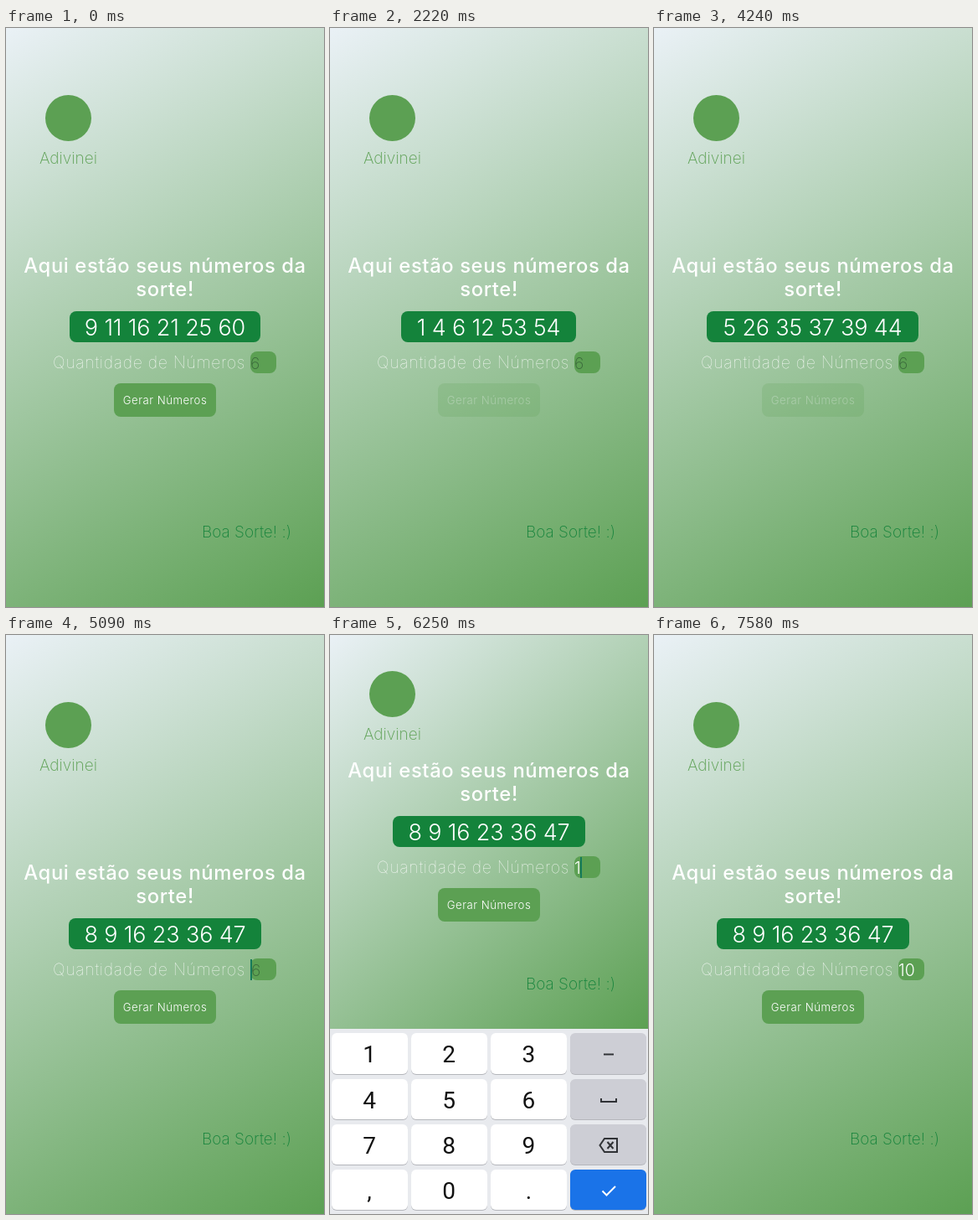
These frames come from a looping animation (380x691 px, 8000 ms). An HTML page:

```html
<!DOCTYPE html>
<html lang="pt">
<head>
<meta charset="utf-8">
<title>Números da sorte</title>
<style>
  html, body { margin: 0; width: 100%; height: 100%; overflow: hidden; background: #fff; }
  #stage { position: relative; width: 380px; height: 691px; overflow: hidden; background: #fff;
    font-family: Inter, "Open Sans", sans-serif; --green: #5ca053; --dark: #14833b; }
  #stage div { position: absolute; white-space: nowrap; box-sizing: border-box; }
  #bg { left: 0; top: 0; width: 380px; height: 691px; }
  .group { left: 0; top: 0; width: 380px; height: 0; }

  #mark { left: 47px; top: 80px; width: 55px; height: 55px; border-radius: 50%; background: var(--green); }
  #name { left: 0; width: 149px; top: 144px; line-height: 24px; text-align: center;
    font-size: 19px; font-weight: 250; color: var(--green); }
  #title { left: 0; width: 380px; top: 269.5px; text-align: center; line-height: 28.8px;
    font-size: 23.8px; font-weight: 500; letter-spacing: .6px; color: #fff; }
  .draw { top: 338px; height: 37px; line-height: 39px; border-radius: 8px; text-align: center;
    background: var(--dark); color: #fff; font-size: 27px; font-weight: 300; letter-spacing: -.15px; }
  #label { left: 56px; top: 387px; line-height: 24px; font-size: 19.5px; font-weight: 100;
    letter-spacing: .7px; color: #fff; }
  #field { left: 292px; top: 386px; width: 31px; height: 26px; border-radius: 8px; background: var(--green); }
  #field div { left: 0; top: 0; line-height: 28px; font-size: 19.5px; font-weight: 300; color: #fff; }
  #field #hint { color: #38663a; font-weight: 200; }
  #field #caret { top: 1px; width: 2px; height: 25px; background: #157a5a; }
  #button { left: 129px; top: 424px; width: 122px; height: 40px; border-radius: 8px; line-height: 41px;
    text-align: center; background: var(--green); color: #fff; font-size: 13.2px; font-weight: 300;
    letter-spacing: .5px; }
  #luck { left: 234px; top: 590px; line-height: 24px; font-size: 19px; font-weight: 250; color: var(--dark); }

  #keys { left: 0; top: 470px; width: 380px; height: 221px; background: #e8eaee; }
  .key { width: 91px; height: 48.5px; border-radius: 6px; background: #fff; box-shadow: 0 1px 0 #b4b6bb;
    text-align: center; font: 28px/51px Roboto, sans-serif; color: #111; }
  .key.side { background: #cdced5; }
  .key.done { background: #1a73e8; }
  .key svg { position: absolute; left: 33.5px; top: 13px; width: 24px; height: 24px;
    fill: none; stroke: #303236; stroke-width: 2; }
  .key.done svg { stroke: #fff; }
</style>
</head>
<body>
<div id="stage">
  <div id="bg"></div>
  <div class="group" id="head">
    <div id="mark"></div>
    <div id="name">Adivinei</div>
  </div>
  <div class="group" id="main">
    <div id="title">Aqui estão seus números da<br>sorte!</div>
    <div id="label">Quantidade de Números</div>
    <div id="field">
      <div id="hint">6</div>
      <div id="one">1</div>
      <div id="ten">10</div>
      <div id="caret"></div>
    </div>
    <div id="button">Gerar Números</div>
  </div>
  <div class="group" id="foot"><div id="luck">Boa Sorte! :)</div></div>
  <div id="keys"></div>
</div>
<script>
const LOOP = 8000;
const OPEN = 5320, CLOSE = 7420;
const $ = id => document.getElementById(id);

function add(parent, cls, css, html) {
  const el = document.createElement('div');
  el.className = cls;
  el.style.cssText = css;
  el.innerHTML = html;
  parent.append(el);
  return el;
}

// Holds each value from its time until the next entry.
function hold(el, prop, steps) {
  const frames = steps.map(([t, v]) => ({ offset: t / LOOP, [prop]: v, easing: 'steps(1, end)' }));
  frames.push({ offset: 1, [prop]: steps[steps.length - 1][1] });
  el.animate(frames, { duration: LOOP, iterations: Infinity }).startTime = 0;
}

function show(el, from, to) {
  const steps = from > 0 ? [[0, 0], [from, 1]] : [[0, 1]];
  if (to < LOOP) steps.push([to, 0]);
  hold(el, 'opacity', steps);
}

const shift = y => `translateY(${y}px)`;

// Corner-to-corner gradient for a given screen height.
function gradient(h) {
  const angle = 180 - Math.atan(380 / h) * 180 / Math.PI;
  return `linear-gradient(${angle}deg, #eaf1f6, #5ca053)`;
}

// Screen resizes while the keyboard is open
const resized = (el, prop, full, small) => hold(el, prop, [[0, full], [OPEN, small], [CLOSE, full]]);
resized($('bg'), 'height', '691px', '470px');
resized($('bg'), 'backgroundImage', gradient(691), gradient(470));
resized($('head'), 'transform', shift(0), shift(-37));
resized($('main'), 'transform', shift(0), shift(-122));
resized($('foot'), 'transform', shift(0), shift(-185));

// Draws: start, box width, numbers
const draws = [
  [0, 228, '9 11 16 21 25 60'],
  [1290, 209, '1 4 6 12 53 54'],
  [2300, 242, '7 13 27 34 49 52'],
  [3310, 253, '5 26 35 37 39 44'],
  [4320, 230, '8 9 16 23 36 47']
];
draws.forEach(([from, w, nums], i) => {
  const box = add($('main'), 'draw', `left:${Math.floor(190 - w / 2)}px;width:${w}px`, nums);
  show(box, from, i + 1 < draws.length ? draws[i + 1][0] : LOOP);
});

hold($('button'), 'opacity', [
  [0, 1], [1210, .2], [1360, .6], [1440, 1],
  [2220, .2], [2370, .5], [2450, .8], [2530, 1],
  [3310, .2], [3460, .5], [3540, .8], [3620, 1],
  [4240, .2], [4400, .4], [4470, .65], [4550, .88], [4630, 1]
]);

// Field
show($('hint'), 0, 6250);
hold($('hint'), 'transform', [[0, 'none'], [5010, 'translateX(1px)']]);
show($('one'), 6250, 6720);
show($('ten'), 6720, LOOP);
hold($('caret'), 'opacity', [[0, 0], [5010, .6], [5090, 1], [5550, 0], [6100, 1], [7270, 0]]);
hold($('caret'), 'left', [[0, '0px'], [6250, '7px'], [6720, '19px']]);

// Keyboard
const icon = d => `<svg viewBox="0 0 24 24"><path d="${d}"/></svg>`;
const rows = [
  ['1', '2', '3', icon('M6 12.5h12')],
  ['4', '5', '6', icon('M3 10v4h18v-4')],
  ['7', '8', '9', icon('M7 4h15v16H7L1.5 12zM10.5 8l7 8m0-8l-7 8')],
  [',', '0', '.', icon('M4.5 12.5l5 5L20 7')]
];
const keys = rows.map((row, r) => row.map((label, c) => {
  const cls = c < 3 ? 'key' : r < 3 ? 'key side' : 'key done';
  return add($('keys'), cls, `left:${1.5 + c * 95.2}px;top:${5.3 + r * 54.2}px`, label);
}));
hold(keys[3][1], 'backgroundColor', [[0, '#fff'], [6720, '#d6d7db'], [6800, '#fff']]);
hold(keys[3][3], 'backgroundColor', [[0, '#1a73e8'], [7270, '#1659bd']]);
hold($('keys'), 'transform', [
  [0, shift(221)], [OPEN, shift(84)], [5400, shift(36)], [5470, shift(10)], [5550, shift(0)],
  [CLOSE, shift(22)], [7500, shift(84)], [7580, shift(221)]
]);
hold($('keys'), 'opacity', [
  [0, 0], [OPEN, .75], [5400, .9], [5470, 1], [CLOSE, .8], [7500, .3], [7580, 0]
]);
</script>
</body>
</html>
```
